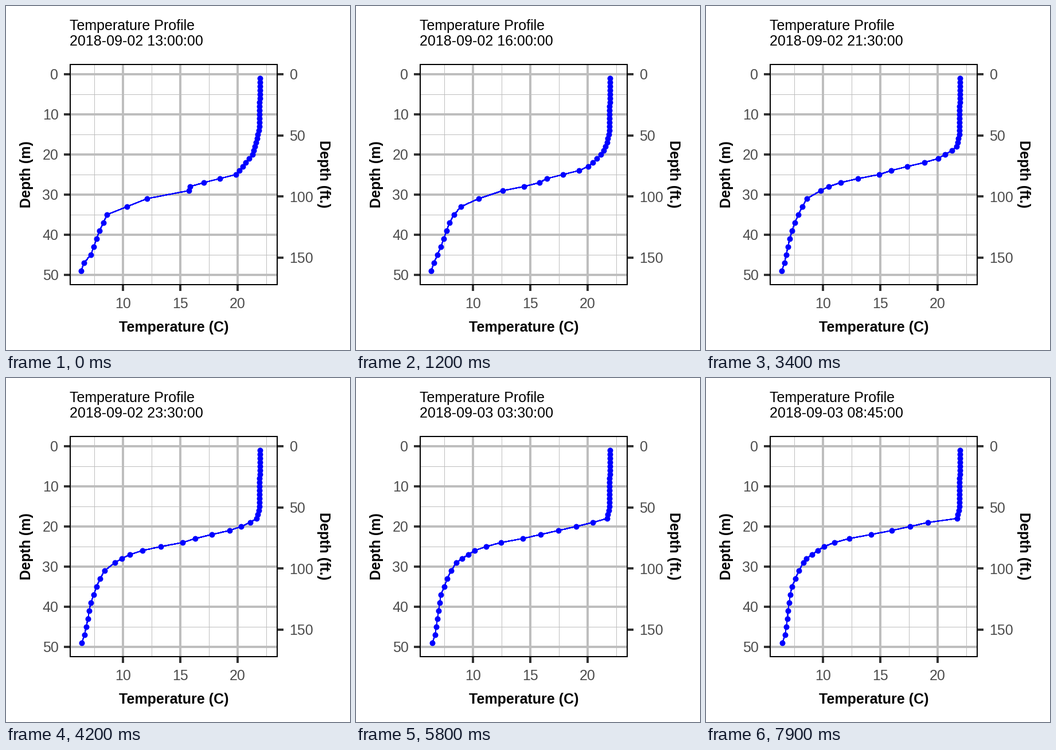
Recreate the animation shown at these times as a matplotlib script. Size 600 by 600 pixels, loop 8000 ms.

```python
import numpy as np
import matplotlib.pyplot as plt
from matplotlib.animation import FuncAnimation
from matplotlib.patches import Rectangle

plt.rcParams["font.family"] = "Liberation Sans"
SIZE, DPI = 600, 100
PT = 72 / DPI
FRAMES, STEP_MS = 80, 100
LEFT, RIGHT, TOP, BOTTOM = 112, 473, 102, 486
GRID, TICK, GREY = "#bebebe", "#333333", "#4d4d4d"

fig = plt.figure(figsize=(SIZE / DPI, SIZE / DPI), dpi=DPI, facecolor="white")
ax = fig.add_axes([0, 0, 1, 1])
ax.set_xlim(0, SIZE)
ax.set_ylim(SIZE, 0)
ax.axis("off")


def temp_x(t):
    return 204 + 20 * (t - 10)


def depth_y(d):
    return 119 + 7 * d


def line(xs, ys, width, color, z):
    ax.plot(xs, ys, lw=width * PT, color=color, zorder=z,
            solid_capstyle="butt", antialiased=False)


def label(x, y, text, color="black", **kw):
    return ax.text(x, y, text, fontsize=25 * PT, color=color, va="baseline",
                   rotation_mode="anchor", zorder=6, **kw)


# Grid, ticks and tick labels
for t in np.arange(7.5, 23, 5):
    line([temp_x(t)] * 2, [TOP, BOTTOM], 1, GRID, 1)
for d in range(5, 50, 10):
    line([LEFT, RIGHT], [depth_y(d)] * 2, 1, GRID, 1)
for t in (10, 15, 20):
    x = temp_x(t)
    line([x, x], [TOP, BOTTOM], 4, GRID, 2)
    line([x, x], [BOTTOM, BOTTOM + 11], 4, TICK, 2)
    label(x - 0.4, 527, str(t), GREY, ha="center")
for d in range(0, 51, 10):
    y = depth_y(d)
    line([LEFT, RIGHT], [y, y], 4, GRID, 2)
    line([LEFT - 11, LEFT], [y, y], 4, TICK, 2)
    label(91.5, y + 9.4, str(d), GREY, ha="right")
for ft in range(0, 151, 50):
    y = depth_y(ft * 0.3048)
    line([RIGHT, RIGHT + 11], [y, y], 4, TICK, 2)
    label(494.5, y + 9.4, str(ft), GREY, ha="left")

ax.add_patch(Rectangle((LEFT, TOP), RIGHT - LEFT, BOTTOM - TOP, fill=False,
                       ec="black", lw=2 * PT, zorder=5, antialiased=False))

# Titles
label(111.3, 42, "Temperature Profile", ha="left")
stamp = label(111.3, 69, "", ha="left")
label(292.5, 568, "Temperature (C)", ha="center", weight="bold")
label(43, 293.5, "Depth (m)", ha="center", weight="bold", rotation=90)
label(546.5, 293.5, "Depth (ft.)", ha="center", weight="bold", rotation=270)

# Isotherms: temperature, depth at the start, depth at the end
ISOTHERMS = [
    (21.95, 1, 1), (21.9, 13, 15), (21.7, 16, 18.03), (21.3, 20, 18.12),
    (19.85, 25, 18.55), (17.05, 27, 20.35), (15.85, 28, 21.1),
    (15.75, 29, 21.2), (12.1, 31, 23.1), (10.35, 33, 24.5), (8.6, 35, 27.85),
    (7.95, 39, 30.5), (7.2, 45, 35.7), (6.7, 46.1, 47), (6.2, 50, 51),
]
LEVEL, FROM, TO = np.array(ISOTHERMS).T
EASE = np.where(LEVEL > 21.5, 4, 1.5)  # the mixed layer settles faster
DEPTHS = np.array([*range(1, 30), *range(31, 50, 2)])
START = np.datetime64("2018-09-02T13:00:00")

curve, = ax.plot([], [], color="blue", lw=1.4 * PT, zorder=3,
                 antialiased=False)
dots, = ax.plot([], [], "o", color="blue", ms=10 * PT, mew=0, zorder=4,
                antialiased=False)


def profile(i):
    left = (1 - i / (FRAMES - 1)) ** EASE
    return np.interp(DEPTHS, TO + (FROM - TO) * left, LEVEL)


def draw(i):
    xs = np.round(temp_x(profile(i)))
    for artist in (curve, dots):
        artist.set_data(xs, depth_y(DEPTHS))
    now = START + np.timedelta64(15 * i, "m")
    stamp.set_text(str(now).replace("T", " "))
    return curve, dots, stamp


anim = FuncAnimation(fig, draw, frames=FRAMES, interval=STEP_MS,
                     repeat=True, repeat_delay=0, blit=False)
plt.show()
```
